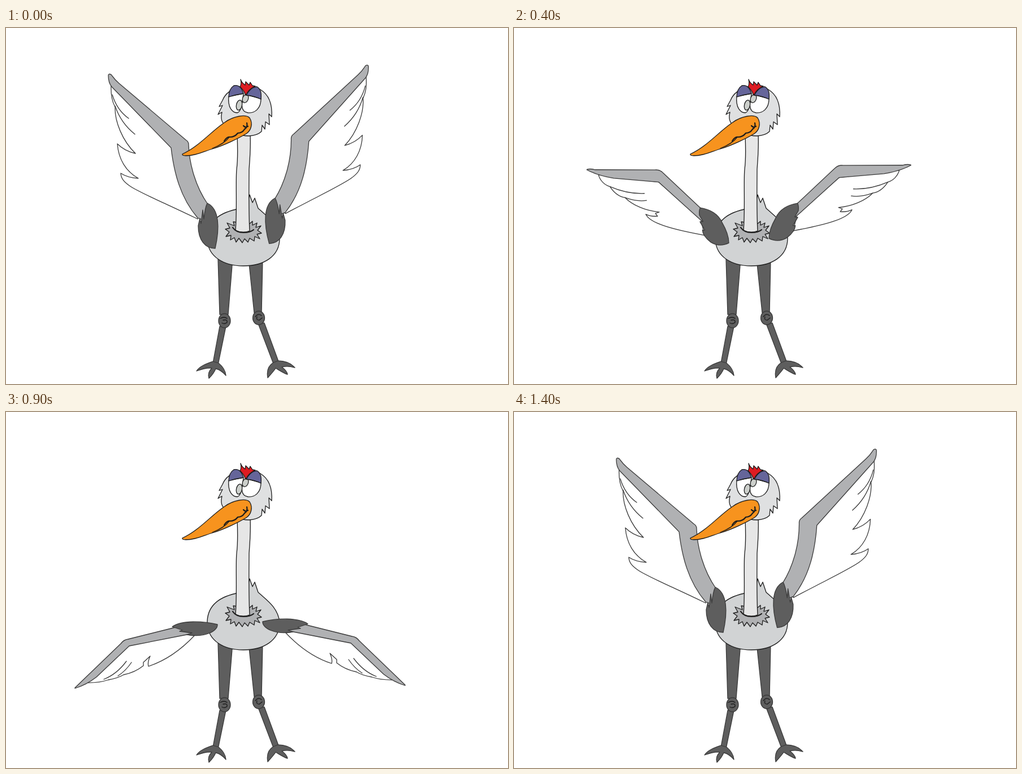
An HTML page for the animation above (1.5 s loop, 888 by 630 pixels).

```html
<!DOCTYPE html>
<html lang="en">
<head>
<meta charset="utf-8">
<title>Flapping crane</title>
<style>
  html, body { margin: 0; width: 100%; height: 100%; overflow: hidden; background: #fff; }
  svg { display: block; width: 888px; height: 630px; }
  path, ellipse { stroke: #1c1c1c; stroke-width: 1.3; stroke-linejoin: round; stroke-linecap: round; }
  .white { fill: #fff; }
  .arm { fill: #b0b1b3; }
  .dark { fill: #5e5e5e; }
  .line { fill: none; }
  .bold { fill: none; stroke-width: 2.2; }
  .wing path, .dark { stroke: #3a3a3a; }
</style>
</head>
<body>
<svg viewBox="0 0 888 630">
  <defs>
    <g id="raised" class="wing">
      <path class="white" d="M186 98C185 120 188 130 193 140C192 165 206 200 229 222Q210 218 197 205C199 232 212 254 234 266Q215 265 203 257C204 280 235 288 339 338L354 310L300 212Z"/>
      <path class="line" d="M188 118Q196 145 217 160M193 138Q203 168 228 188"/>
      <path class="arm" d="M181 84C181 80 186 81 188 85Q193 92 200 98L318 198Q323 201 323 206C324 240 335 280 357 312L362 345L339 336C308 300 297 255 292 212L187 104Q181 97 181 84Z"/>
      <path class="dark" d="M356 310C378 320 378 355 370 390C352 390 340 375 340 350L343 337L345 346L348 322L350 338Q352 318 356 310Z"/>
    </g>
    <g id="spread" class="wing">
      <path class="white" d="M122 323C127 332 137 338 147 338C157 347 168 351 178 350C195 360 220 363 243 359L237 363L242 367Q230 371 221 369C232 382 270 383 331 378L316 350L228 308Z"/>
      <path class="line" d="M147 338Q180 343 209 334M178 350Q200 352 216 345"/>
      <path class="arm" d="M100 319Q106 316 114 316L216 289Q224 286 231 290L313 334L335 358L318 354L228 308L150 322Q122 325 100 320Z"/>
      <path class="dark" d="M311 333Q340 330 355 348Q372 365 376 380Q362 392 345 387Q328 380 325 370L329 369L317 357L322 355L313 346Q310 338 311 333Z"/>
    </g>
    <g id="lowered" class="wing">
      <path class="white" d="M140 479Q163 480 181 474Q198 471 208 465Q228 461 243 449L243 443L255 432Q250 443 252 450Q295 436 333 396L300 390L217 412Z"/>
      <path class="line" d="M173 473Q196 464 213 441M198 467Q212 458 222 443"/>
      <path class="arm" d="M122 488L203 410Q208 403 216 402L300 381L340 385L325 393L218 414L160 469Q142 483 122 489Z"/>
      <path class="dark" d="M294 380C310 368 350 370 374 376C375 388 350 400 320 394L329 391L307 388L312 386Z"/>
    </g>
  </defs>

  <path class="dark" d="M375 408L378 507H393L401 408ZM378 528L366 593L375 596L389 528Z"/>
  <path class="dark" d="M366 590C355 594 343 598 337 607C348 603 357 601 364 602C358 608 357 614 359 620C365 614 369 608 371 603C377 604 383 608 389 615C388 604 382 598 376 593Z"/>
  <ellipse class="dark" cx="386.500" cy="518" rx="10.500" ry="12.500"/>
  <path class="line" d="M379 514Q386 510 391 514M384 517Q392 515 391 521Q387 525 382 522"/>
  <path class="dark" d="M429 408L439 504H452L454 408ZM446 523L473 594L482 590L457 522Z"/>
  <path class="dark" d="M473 592C463 598 461 608 463 619C469 612 474 607 477 602C484 606 491 611 498 613C497 607 492 603 488 600C496 598 504 599 511 601C503 592 491 589 481 589Z"/>
  <ellipse class="dark" cx="447" cy="513" rx="10.500" ry="12"/>
  <path class="line" d="M441 511Q446 504 452 509M444 511Q442 517 448 517L453 513"/>

  <path fill="#d1d3d4" d="M407 321C375 328 355 345 356 375C358 405 385 421 420 421C455 421 484 405 484 372C481 345 460 332 446 319L440 301L436 309L431 295L425 320Z"/>
  <path class="arm" d="M402 343L404 350L391 345L396 354L388 356L395 361L389 369L398 367L397 375L404 371L407 379L412 372L418 380L422 373L428 379L431 372L439 377L440 369L449 373L444 365L452 363L445 358L451 350L442 353L444 345L436 349L436 342L430 347Z"/>

  <g id="wings"></g>

  <path fill="#e6e6e6" d="M409 190C410 215 410 235 408 250C406 270 409 320 406 358Q418 364 431 359C429 320 430 270 430 250C432 225 433 210 432 188Z"/>
  <path class="bold" d="M401 353Q407 362 420 362Q432 362 438 357"/>
  <path fill="#dfe0e1" d="M415 104Q390 110 383 128L377 139L383 137L375 153L382 149Q378 165 388 172Q405 191 430 191Q445 190 452 183L453 172L458 179L459 166L466 171L465 152L470 157Q472 122 450 109Q432 101 415 104Z"/>
  <path class="white" d="M394 121C392 140 400 150 409 150C414 149 417 142 420 116Z"/>
  <ellipse fill="#cccfcb" cx="412.500" cy="136.500" rx="5" ry="9" transform="rotate(12 412.500 136.500)"/>
  <path class="white" d="M425 118C415 130 414 148 428 150C440 151 451 143 451 125Z"/>
  <ellipse fill="#cccfcb" cx="423.500" cy="125" rx="5" ry="7.500" transform="rotate(22 423.500 125)"/>
  <path fill="#65659a" d="M394 122Q394 108 403 102Q415 99 420 116Q406 118 394 122Z"/>
  <path fill="#dd1c22" d="M415 91Q417 97 423 101L424 95L430 101L432 96L436 102L441 103Q430 107 424 119Q420 109 414 104Q417 99 415 91Z"/>
  <path fill="#65659a" d="M425 119Q433 104 444 104Q453 109 451 126Q438 120 425 119Z"/>
  <path fill="#f7931e" d="M312 223C340 211 365 181 387 167C402 156 424 152 431 159C437 169 434 181 425 187C410 196 385 208 365 214C348 219 335 226 318 226Q311 226 312 223Z"/>
  <path class="line" d="M365 213Q386 205 395 193"/>
  <path class="bold" d="M386 200Q391 192 396 193Q405 193 410 186Q418 186 422 179Q428 175 426 168M420 173Q423 177 428 174"/>
</svg>
<script>
  // Each pose: wing shape, its turn at the shoulder, and the mirror that makes the right wing.
  const poses = {
    A: ["raised", "", "-1 .04 .044 1 818.4 -23.2"],
    B: ["raised", "translate(10.400 -1) scale(.98 1) rotate(-10.6 372 388)", "-1 0 0 1 824 0"],
    C: ["spread", "translate(3 0) rotate(15 375 384)", "-1 0 0 1 831 -8"],
    D: ["spread", "", "-1 0 0 1 828 -7"],
    E: ["spread", "translate(5.600 5.800) scale(.985) rotate(-16 375 384)", "-1 0 0 1 828 -6"],
    F: ["lowered", "", "-1 0 0 1 828 -5"],
    G: ["lowered", "rotate(-23 374 382)", "-1 0 0 1 828 -5"]
  };
  // One entry per 100 ms; two letters are a half-transparent overlap.
  const steps = "A AB B BC C D E F G F E D C B A".split(" ");
  const wings = document.getElementById("wings");

  wings.innerHTML = Object.entries(poses).map(([name, [shape, turn, mirror]]) => {
    const left = `<use href="#${shape}" transform="${turn}"/>`;
    return `<g data-pose="${name}">${left}<g transform="matrix(${mirror})">${left}</g></g>`;
  }).join("");

  function draw() {
    const step = steps[Math.floor(performance.now() / 100) % steps.length];
    for (const pose of wings.children) {
      pose.style.display = step.includes(pose.dataset.pose) ? "" : "none";
      pose.style.opacity = 1 / step.length;
    }
    requestAnimationFrame(draw);
  }
  draw();
</script>
</body>
</html>
```
